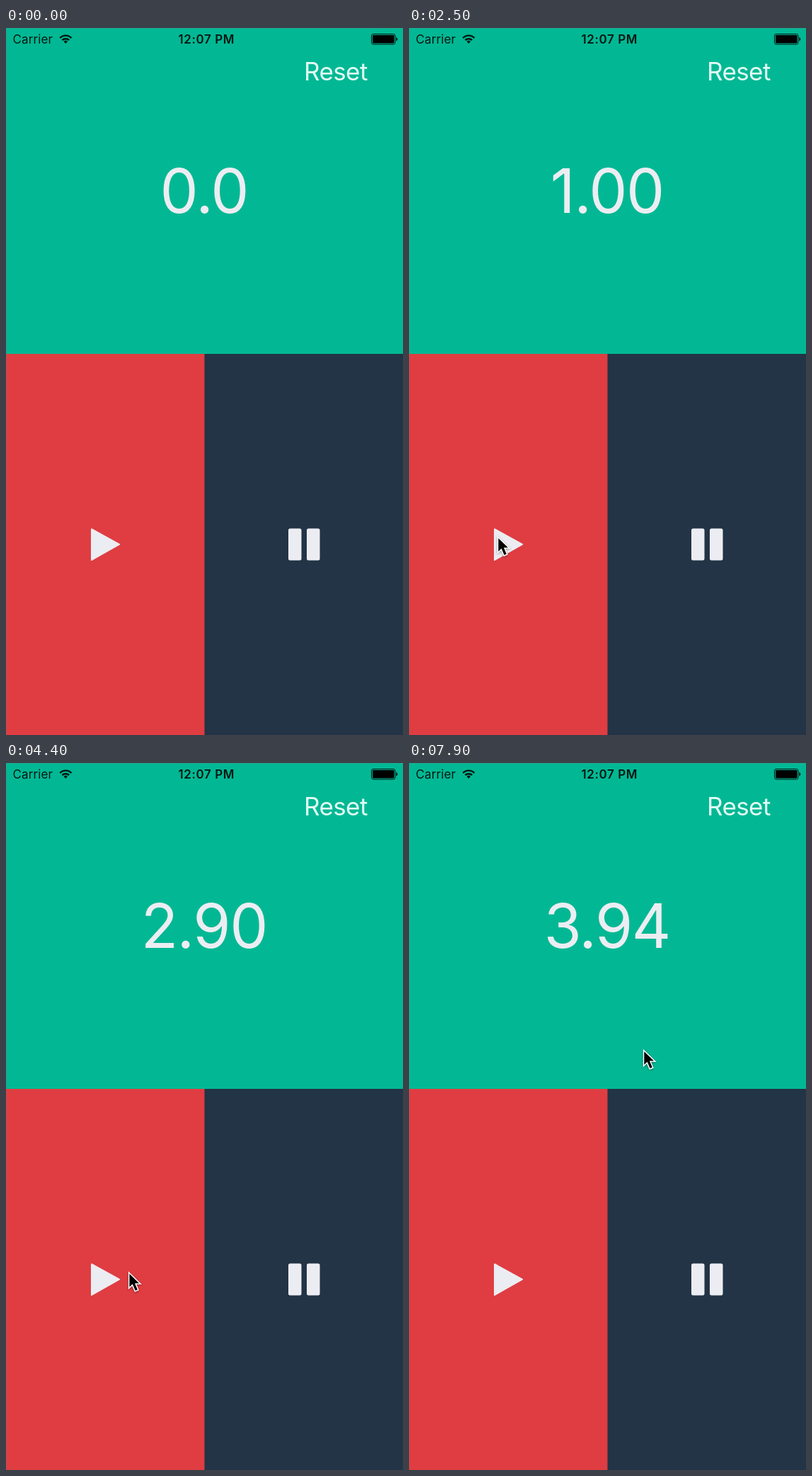
An HTML page that plays this animation: 561 by 998 pixels, repeating every 8000 ms.

```html
<!DOCTYPE html>
<html lang="en">
<head>
<meta charset="utf-8">
<title>Stopwatch</title>
<style>
  html, body { margin: 0; width: 100%; height: 100%; overflow: hidden; background: #02b894; }
  svg { display: block; width: 100vw; height: 100vh; }
  text { font-family: Inter, Roboto, sans-serif; }
  .status { font-size: 17px; fill: #031712; }
  .clock { font-weight: 600; text-anchor: middle; letter-spacing: .6px; }
  .reset { font-size: 35px; fill: #e2fbf4; letter-spacing: -.6px; }
  .time { font-size: 86px; fill: #ecedf2; text-anchor: middle; letter-spacing: -1.5px; }
  .icon { fill: #ecedf2; stroke: #ecedf2; stroke-width: 2; stroke-linejoin: round; }
  .arrow { stroke: #fff; stroke-width: 3; paint-order: stroke; filter: drop-shadow(0 1.5px 1.5px rgba(0,0,0,.4)); }
</style>
</head>
<body>
<svg viewBox="0 0 561 998">
  <rect width="561" height="998" fill="#02b894"/>
  <rect y="460" width="561" height="538" fill="#df3d42"/>
  <rect x="280.5" y="460" width="281" height="538" fill="#223445"/>
  <path d="M.5 998V.5H561" fill="none" stroke="#777" stroke-opacity=".3"/>

  <text class="status" x="9.5" y="22" letter-spacing=".15">Carrier</text>
  <g fill="none" stroke="#031712" stroke-width="2.4">
    <path d="M76.2 14.1a11.2 11.2 0 0 1 16.2 0M79.4 17.2a7 7 0 0 1 9.8 0"/>
    <path d="M84.3 22l-2.7-2.9a3.8 3.8 0 0 1 5.4 0z" fill="#031712" stroke="none"/>
  </g>
  <text class="status clock" x="283.3" y="22">12:07 PM</text>
  <rect x="516.5" y="8.5" width="33.5" height="14.5" rx="2.5" fill="none" stroke="#031712"/>
  <rect x="518" y="10" width="30.5" height="11.5" rx="1.2"/>
  <path d="M551.3 13q2 .6 2 2.8t-2 2.8z" fill="#031712"/>

  <text class="reset" x="421" y="74">Reset</text>
  <text class="time" id="time" x="279.8" y="261">0.0</text>

  <path class="icon" d="M121 707.5L160 729L121 751Z"/>
  <rect class="icon" x="400" y="707.5" width="16.5" height="43" rx="1.5"/>
  <rect class="icon" x="426" y="707.5" width="16.5" height="43" rx="1.5"/>

  <path class="arrow" id="cursor" d="M1.3 3.2V22L5.6 17.8L9.6 27L12.8 25.6L8.9 16.6H15Z"/>
</svg>
<script>
const LOOP = 8000, STEP = 100;
const PLAY_AT = 1500, PAUSED_VALUE = 3.94;
const timeLabel = document.getElementById('time');
const cursor = document.getElementById('cursor');

const entry = { x: 566, y: 560 };
const moves = [
  { from: 700, to: 1300, x: 125, y: 717 },   // to play
  { from: 4200, to: 5000, x: 433, y: 722 },  // to pause
  { from: 5500, to: 5900, x: 415, y: 734 },  // drift after the click
  { from: 6100, to: 6900, x: 456, y: 143 },  // up towards reset
  { from: 7600, to: 7900, x: 331, y: 404 }   // away
];

const clamp = (v, lo, hi) => Math.min(hi, Math.max(lo, v));
const smooth = u => u * u * (3 - 2 * u);

// The counter starts slightly late and catches up within its first second.
function secondsAt(t) {
  const elapsed = (t - PLAY_AT) / 1000;
  const lag = Math.max(0, 1 - elapsed) / 15;
  return clamp(elapsed - lag, 0, PAUSED_VALUE);
}

function cursorAt(t) {
  return moves.reduce((p, m) => {
    const u = smooth(clamp((t - m.from) / (m.to - m.from), 0, 1));
    return { x: p.x + (m.x - p.x) * u, y: p.y + (m.y - p.y) * u };
  }, entry);
}

function draw(ms) {
  const t = Math.floor((ms % LOOP) / STEP) * STEP;
  const seconds = secondsAt(t);
  timeLabel.textContent = seconds > 0 ? seconds.toFixed(2) : '0.0';
  const { x, y } = cursorAt(t);
  cursor.setAttribute('transform', `translate(${x} ${y})`);
}

const start = performance.now();
function tick() {
  draw(performance.now() - start);
  requestAnimationFrame(tick);
}
tick();
</script>
</body>
</html>
```
